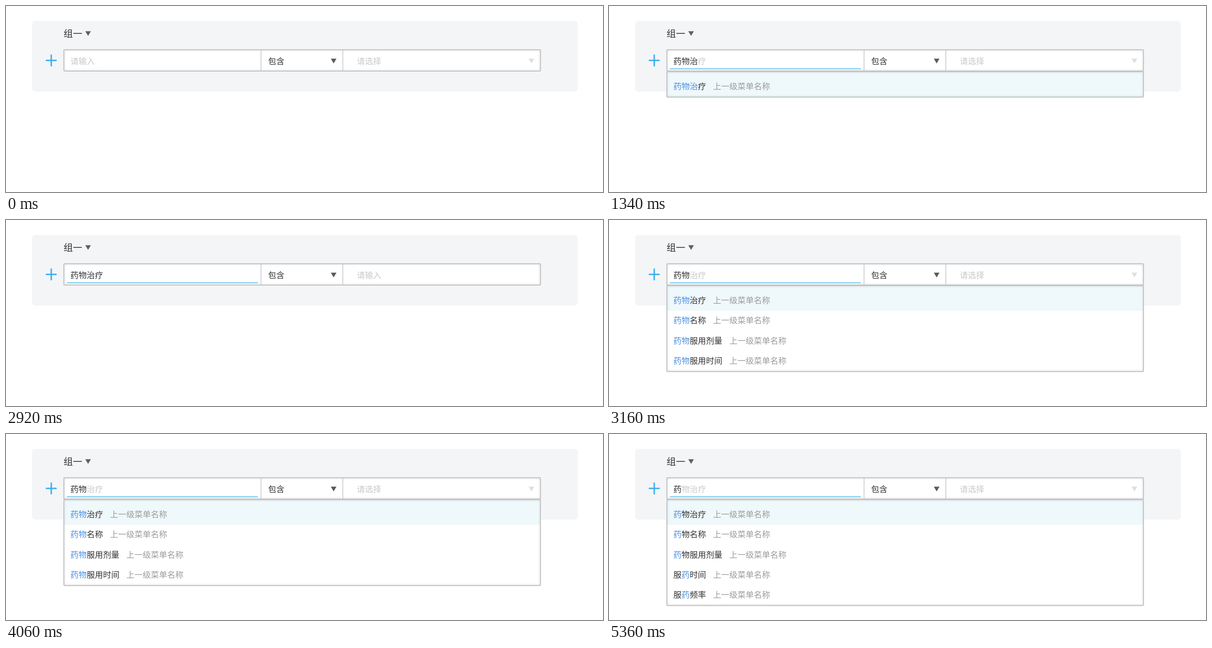
Recreate the animation shown at these times as an HTML page. Size 1280 by 400 pixels, loop 5.56 s.

```html
<!DOCTYPE html>
<html lang="zh-CN">
<head>
<meta charset="utf-8">
<title>条件筛选</title>
<style>
  html, body { margin: 0; width: 100%; height: 100%; overflow: hidden; background: #fff; }
  #stage { position: relative; width: 1280px; height: 400px; overflow: hidden; }
  #stage > * { position: absolute; box-sizing: border-box; }
  .panel { left: 56px; top: 32px; width: 1170px; height: 152px; border-radius: 7px; background: #f4f5f7; }
  .box {
    left: 123px; width: 1024px; border: 2px solid #c2c3c4; border-radius: 3px;
    background: #fff; box-shadow: inset 0 0 5px rgba(0, 0, 0, .16);
  }
  #field { top: 93px; height: 48px; }
  #list { top: 140px; }
  svg { left: 0; top: 0; }
  text { font: 17.5px "Noto Sans CJK SC", "Noto Sans CJK", sans-serif; fill: #333; white-space: pre; }
  .title { font-size: 20px; }
  .hint { fill: #c9c9c9; }
  .sub { fill: #9b9b9b; }
  .hit { fill: #4a90e2; }
  .error { font-size: 14.5px; fill: #e8848f; }
  .quote { font-family: "Noto Sans", sans-serif; }
</style>
</head>
<body>
<div id="stage">
  <div class="panel"></div>
  <div class="box" id="field"></div>
  <div class="box" id="list"></div>
  <svg width="1280" height="400" viewBox="0 0 1280 400">
    <text class="title" x="123.5" y="67">组一</text>
    <path d="M170 54.3h12l-6 10z" fill="#606060"/>
    <path d="M97 105.5v23M86.5 117h21" stroke="#38aef0" stroke-width="3" stroke-linecap="round"/>
    <path d="M546.8 95v44M722.2 95v44" stroke="#c4c5c6" stroke-width="1.5"/>
    <text x="562" y="124.6">包含</text>
    <path d="M696.5 113.2h12l-6 10.3z" fill="#5a5a5a"/>
    <path id="arrow" d="M1120.5 113.2h12l-6 10.3z" fill="#dedede"/>
    <text id="value" class="hint" x="752" y="124.6"></text>
    <text id="input" x="138" y="124.6"></text>
    <path id="line" fill="none" stroke-width="1.5"/>
    <g id="rows"></g>
  </svg>
</div>
<script>
const LOOP = 5560, FRAME = 40, EM = 17.5, PITCH = 43.2;
const BLUE = '#45b8ec', RED = '#e27a87';
const LEFT = [130.5, 540], RIGHT = [729.5, 1140];
const PARENT = '上一级菜单名称', WORD = '药物治疗';

const MATCHES = {
  '药': ['药物治疗', '药物名称', '药物服用剂量', '服药时间', '服药频率'],
  '药物': ['药物治疗', '药物名称', '药物服用剂量', '药物服用时间'],
  '药物治': ['药物治疗']
};

// start, typed text, underlined side, growth time of the underline
const STEPS = [
  [0, '', null],
  [500, '', LEFT, 240],
  [740, '药', LEFT],
  [1040, '药物', LEFT],
  [1340, '药物治', LEFT],
  [1640, WORD, LEFT],
  [2140, WORD, null],
  [2180, WORD, RIGHT, 280],
  [2520, WORD, null],
  [2720, WORD, LEFT, 240],
  [2960, '药物治', LEFT],
  [3160, '药物', LEFT],
  [3360, '药', LEFT],
  [3560, '', LEFT],
  [3760, '药', LEFT],
  [4060, '药物', LEFT],
  [4360, '药物剂量', LEFT],
  [5160, '药物', LEFT],
  [5360, '药', LEFT]
];

const $ = id => document.getElementById(id);
const span = (cls, s) => `<tspan class="${cls}">${s}</tspan>`;

function row(name, y, typed) {
  const label = typed ? name.replace(typed, span('hit', typed)) : name;
  const x = 138 + EM * name.length + 15;
  return `<text x="138" y="${y}">${label}</text><text class="sub" x="${x}" y="${y}">${PARENT}</text>`;
}

function matchRows(typed) {
  return '<rect x="125" y="142" width="1020" height="53" fill="rgba(60,160,200,.08)"/>' +
    MATCHES[typed].map((name, i) => row(name, 179.1 + i * PITCH, typed)).join('');
}

function errorRows(typed) {
  return `<text class="error" y="166"><tspan x="138">无法找到</tspan>` +
    `<tspan class="quote" x="197">“</tspan><tspan x="204">${typed}</tspan>` +
    `<tspan class="quote" x="263">”</tspan><tspan x="270">，</tspan>` +
    `<tspan x="284.7">您也许在找</tspan><tspan x="357.2">：</tspan></text>` +
    '<path d="M124 178.6h1022" stroke="#c2c3c4" stroke-width="1.6"/>' +
    ['药物治疗', '药物名称'].map((name, i) => row(name, 216 + i * PITCH)).join('');
}

function showText(typed) {
  const found = MATCHES[typed], done = typed === WORD;
  const failed = typed && !found && !done;
  $('input').innerHTML = found ? typed + span('hint', WORD.slice(typed.length))
    : typed || span('hint', '请输入');
  $('value').textContent = done ? '请输入' : '请选择';
  $('arrow').style.display = done ? 'none' : '';
  $('list').style.display = found || failed ? '' : 'none';
  const bottom = found ? 197 + Math.round(43.25 * (found.length - 1)) : 277;
  $('list').style.height = bottom - 140 + 'px';
  $('rows').innerHTML = found ? matchRows(typed) : failed ? errorRows(typed) : '';
  $('line').setAttribute('stroke', failed ? RED : BLUE);
}

function showLine(side, part) {
  if (!side) return $('line').setAttribute('d', '');
  const mid = (side[0] + side[1]) / 2, half = (side[1] - side[0]) / 2 * part;
  $('line').setAttribute('d', `M${mid - half} 135H${mid + half}`);
}

let shown = null;
function draw() {
  const t = performance.now() % LOOP;
  const [start, typed, side, grow] = STEPS.findLast(s => s[0] <= t);
  if (typed !== shown) showText(shown = typed);
  const frames = Math.floor((t - start) / FRAME) + 1;
  showLine(side, grow ? Math.min(1, frames * FRAME / grow) : 1);
  requestAnimationFrame(draw);
}
draw();
</script>
</body>
</html>
```
